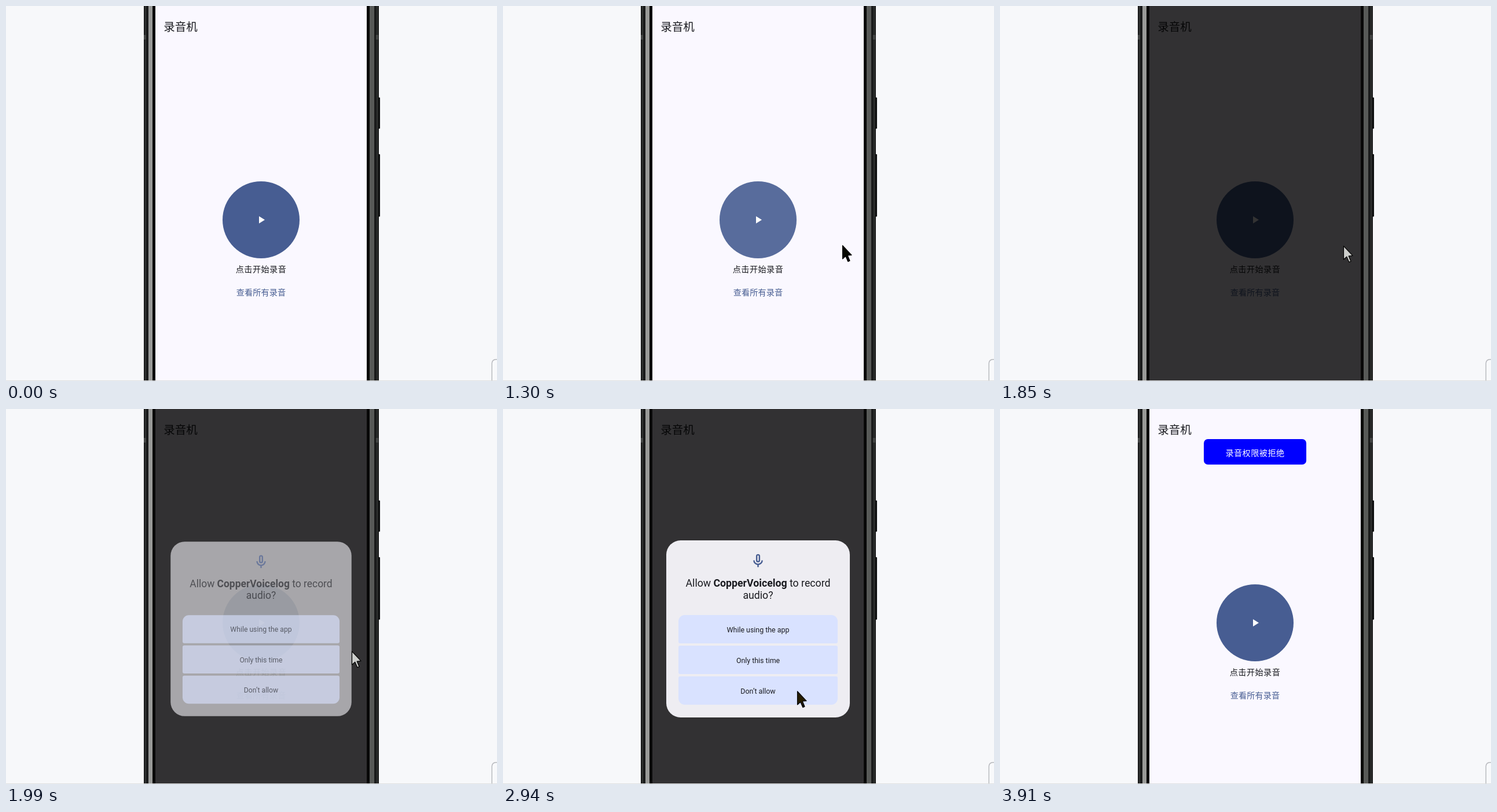
Recreate the animation shown at these times as an HTML page with a canvas. Size 848 by 648 pixels, loop 4.64 s.

```html
<!DOCTYPE html>
<html lang="zh">
<head>
<meta charset="utf-8">
<title>录音机</title>
<style>
html, body { margin: 0; width: 100%; height: 100%; overflow: hidden; background: #f7f8fa; }
canvas { display: block; }
</style>
</head>
<body>
<canvas id="stage" width="848" height="648"></canvas>
<script>
const ctx = document.getElementById('stage').getContext('2d');
const LOOP = 4640, DP = 0.886, MID = 440.5, FLOOR = 647;
const CJK = '"Noto Sans CJK SC", "Noto Sans CJK", "Noto Sans CJK JP", sans-serif';
const ROBOTO = 'Roboto, sans-serif';
const INK = '#1a1b20', PRIMARY = '#475d92';
const TAP = 810, DIM = 1840, DENY = 3005, GONE = 3900;

const ramp = (t, a, b) => Math.max(0, Math.min(1, (t - a) / (b - a)));
const easeOut = v => 1 - (1 - v) ** 2;
const smooth = v => v * v * (3 - 2 * v);
const linear = v => v;

// Pointer moves: start, end, destination, easing
const ENTRY = { x: 847, y: 620 };
const moves = [
  { from: 130, to: 620, x: 417, y: 380, ease: linear },
  { from: TAP, to: 1160, x: 586, y: 413, ease: smooth },
  { from: 1300, to: 1780, x: 593, y: 414, ease: linear },
  { from: DIM, to: 2120, x: 600, y: 421, ease: smooth },
  { from: 2460, to: 2880, x: 508, y: 487, ease: smooth },
  { from: 2940, to: DENY, x: 543, y: 487, ease: linear },
  { from: DENY, to: 3290, x: 628, y: 530, ease: easeOut },
  { from: 3560, to: GONE, x: 770, y: 650, ease: linear }
];

// The picture refreshes every 68.7 ms, realigned each 1166 ms
function snap(time) {
  const first = 128, cycle = 1166, step = 68.7;
  if (time < first) return 0;
  const inCycle = (time - first) % cycle;
  return time - inCycle % step;
}

function box(color, x, y, w, h) {
  ctx.fillStyle = color;
  ctx.fillRect(x, y, w, h);
}

function round(color, x, y, w, h, r) {
  ctx.fillStyle = color;
  ctx.beginPath();
  ctx.roundRect(x, y, w, h, r);
  ctx.fill();
}

function disc(color, x, y, r) {
  ctx.fillStyle = color;
  ctx.beginPath();
  ctx.arc(x, y, r, 0, Math.PI * 2);
  ctx.fill();
}

function poly(points) {
  ctx.beginPath();
  points.forEach(([x, y]) => ctx.lineTo(x, y));
  ctx.closePath();
}

function setFont({ font, gap = 0, color = INK }) {
  ctx.font = font;
  ctx.letterSpacing = gap + 'px';
  ctx.fillStyle = color;
}

// Draws one line of styled runs, centred unless a left edge is given
function line(runs, y, left) {
  const widths = runs.map(run => {
    setFont(run);
    return ctx.measureText(run.text).width;
  });
  let x = left ?? MID - widths.reduce((a, b) => a + b, 0) / 2;
  runs.forEach((run, i) => {
    setFont(run);
    ctx.fillText(run.text, x, y);
    x += widths[i];
  });
}

// Side rail of the phone, given from its outer edge inwards
function rail(edge, dir, metal, width) {
  const strip = (color, from, w) =>
    box(color, dir > 0 ? edge + from : edge - from - w, 0, w, FLOOR);
  strip('#1a1b1b', 0, 8);
  strip('#303231', 2, 2);
  strip(metal, 8, width);
  strip('#080808', 8 + width, 5);
  box('#444645', dir > 0 ? edge : edge - 5, 50, 4, 8);
}

function drawPhone() {
  box('#f7f8fa', 0, 0, 848, 648);
  round('#b9bbbf', 838.5, 610, 30, 60, 7);
  round('#f8f9fb', 840, 611.5, 30, 60, 6);
  rail(238, 1, '#999a98', 7);
  rail(644, -1, '#585a58', 8);
  round('#111212', 643, 158, 3, 54, 1);
  round('#111212', 643, 256, 3, 108, 1);
}

function drawRipple(t) {
  const alpha = 0.09 * (1 - ramp(t, 1300, 1720));
  if (t < TAP || alpha <= 0) return;
  const grow = easeOut(ramp(t, TAP, 1120));
  ctx.save();
  ctx.beginPath();
  ctx.arc(MID, 369.5, 66.5, 0, Math.PI * 2);
  ctx.clip();
  disc(`rgba(255,255,255,${alpha})`, 415 + 25.5 * grow, 379 - 9.5 * grow, 85 * grow);
  ctx.restore();
}

function drawApp(t) {
  const body = `${16 * DP}px ${CJK}`;
  box('#faf8ff', 258, 0, 365, FLOOR);
  line([{ text: '录音机', font: `${22 * DP}px ${CJK}` }], 43, 272.2);
  disc(PRIMARY, MID, 369.5, 66.5);
  drawRipple(t);
  ctx.fillStyle = '#fff';
  poly([[437, 363.3], [447, 369.5], [437, 375.7]]);
  ctx.fill();
  line([{ text: '点击开始录音', font: body, gap: 0.44 }], 460);
  line([{ text: '查看所有录音', font: `500 ${body}`, gap: 0.13, color: PRIMARY }], 499.5);
}

function drawMic() {
  ctx.save();
  ctx.translate(MID, 262);
  ctx.scale(1.19, 1.19);
  ctx.translate(-12, -11.5);
  ctx.strokeStyle = PRIMARY;
  ctx.lineWidth = 2;
  ctx.beginPath();
  ctx.roundRect(10, 3, 4, 10, 2);
  ctx.moveTo(18, 11);
  ctx.arc(12, 11, 6, 0, Math.PI);
  ctx.moveTo(12, 17);
  ctx.lineTo(12, 21);
  ctx.stroke();
  ctx.restore();
}

function drawDialog(show) {
  if (show <= 0) return;
  const zoom = 0.9 + 0.1 * easeOut(show);
  const font = `${20 * DP}px ${ROBOTO}`;
  ctx.save();
  ctx.globalAlpha = show;
  ctx.translate(MID, 380);
  ctx.scale(zoom, zoom);
  ctx.translate(-MID, -380);
  round('#eeedf2', 282, 227, 317, 306, 28 * DP);
  drawMic();
  line([
    { text: 'Allow ', font },
    { text: 'CopperVoicelog', font: `bold ${font}` },
    { text: ' to record', font }
  ], 306.5);
  line([{ text: 'audio?', font }], 327.5);
  ['While using the app', 'Only this time', 'Don’t allow'].forEach((text, i) => {
    const top = i === 0 ? 11 : 3, bottom = i === 2 ? 11 : 3, y = 356 + 53 * i;
    round('#d9e2ff', 303, y, 275, 49, [top, top, bottom, bottom]);
    line([{ text, font: `${14 * DP}px ${ROBOTO}` }], y + 29.5);
  });
  ctx.restore();
}

function drawToast(show) {
  if (show <= 0) return;
  ctx.save();
  ctx.globalAlpha = show;
  round('#0000ff', 352, 52, 177, 44, 7);
  line([{ text: '录音权限被拒绝', font: `${16 * DP}px ${CJK}`, gap: 0.44, color: '#fff' }], 80.5);
  ctx.restore();
}

function pointerAt(t) {
  return moves.reduce((p, m) => {
    const k = m.ease(ramp(t, m.from, m.to));
    return { x: p.x + (m.x - p.x) * k, y: p.y + (m.y - p.y) * k };
  }, ENTRY);
}

// Pointer fill inverts whatever lies beneath it
function drawPointer(t) {
  if (t < 128 || t >= GONE) return;
  const { x, y } = pointerAt(t);
  ctx.save();
  ctx.translate(Math.round(x), Math.round(y));
  poly([[0.5, 0.8], [0.5, 24], [5.8, 19.2], [9.8, 28.6], [13, 27.2], [9.2, 18], [16, 17.4]]);
  ctx.globalCompositeOperation = 'difference';
  ctx.fillStyle = '#fff';
  ctx.fill();
  ctx.globalCompositeOperation = 'source-over';
  ctx.strokeStyle = '#000';
  ctx.lineWidth = 1.2;
  ctx.lineJoin = 'round';
  ctx.stroke();
  ctx.restore();
}

function draw(now) {
  const t = snap(now % LOOP);
  drawPhone();
  drawApp(t);
  if (t >= DIM && t < DENY) {
    box('rgba(0,0,0,0.8)', 258, 0, 365, FLOOR);
    drawDialog(ramp(t, DIM + 10, 2060));
  }
  drawToast(ramp(t, DENY + 10, 3150));
  drawPointer(t);
  box('#dedfe0', 0, FLOOR, 848, 1);
}

let start;
function tick(now) {
  start ??= now;
  draw(now - start);
  requestAnimationFrame(tick);
}
draw(0);
requestAnimationFrame(tick);
</script>
</body>
</html>
```
